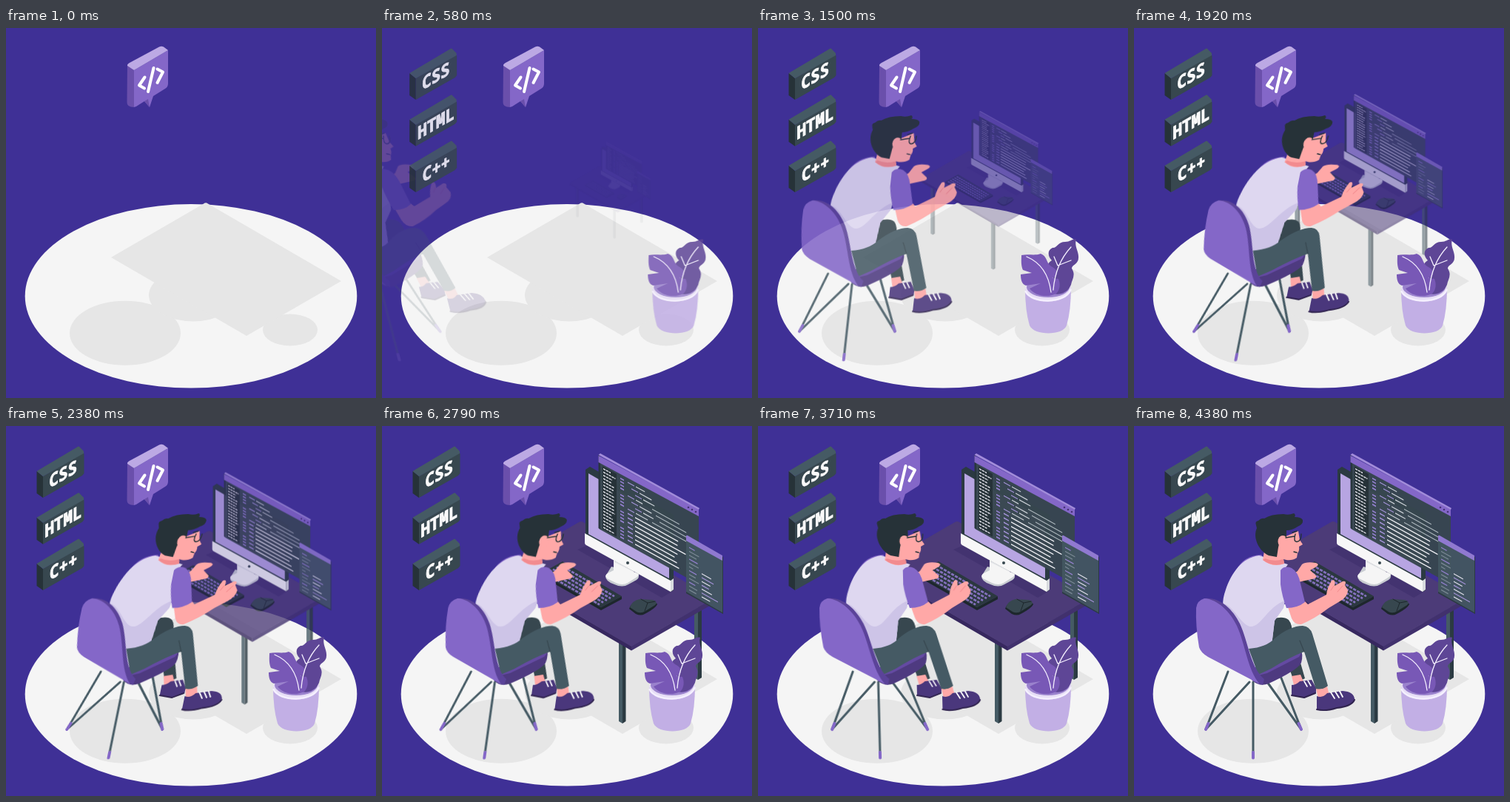
Write an HTML page that moves like this. It is 500x500 px and loops after 4.43 s.

```html
<!DOCTYPE html>
<html lang="en">
<head>
<meta charset="utf-8">
<title>Programmer at a desk</title>
<style>
html, body { margin: 0; height: 100%; overflow: hidden; background: #3f3096; }
svg { display: block; width: 100vw; height: 100vh; }
.anim { animation: 4430ms linear infinite both; }

#man { transform-origin: 191.5px 284.5px; animation-name: lightspeed; animation-timing-function: cubic-bezier(.36, -.01, .5, 1.38); }
@keyframes lightspeed {
  0% { transform: translate(-220px) skewX(20deg); opacity: 0; }
  58.7% { transform: translate(0px) skewX(-10deg); opacity: 1; }
  78.3% { transform: translate(0px) skewX(2deg); opacity: 1; }
  97.8%, 100% { transform: translate(0px) skewX(0deg); opacity: 1; }
}

#desk { transform-origin: 308px 219px; animation-name: zoom; }
@keyframes zoom {
  0%, 1% { transform: scale(.24); opacity: 0; }
  10% { transform: scale(.33); opacity: .03; }
  22.6% { transform: scale(.447); opacity: .14; }
  33.9% { transform: scale(.588); opacity: .34; }
  49.9% { transform: scale(.8); opacity: .69; }
  62.7%, 100% { transform: none; opacity: 1; }
}

.slide { animation-name: slide; animation-timing-function: cubic-bezier(.36, -.01, .5, 1.38); }
@keyframes slide {
  0%, 1% { transform: translate(var(--from)); opacity: 0; }
  22.5%, 100% { transform: translate(0px); opacity: 1; }
}

.label text { font: 700 24px "Noto Sans Mono", "DejaVu Sans Mono", monospace; fill: #fafafa; stroke: #fafafa; stroke-width: 1; stroke-linejoin: round; }
.line { fill: none; stroke-linecap: round; stroke-linejoin: round; }
</style>
</head>
<body>
<svg viewBox="0 0 500 500">
  <defs>
    <g id="plate">
      <path fill="#37474f" d="M50 68 103 37Q105.500 36 105.500 38V64L103 67 50 97Z"/>
      <path fill="#263238" d="M41.500 61 50 68V97L41.500 91Z"/>
      <path fill="#455a64" d="M41.500 61 97 28Q98 27 99 28L105 34V37L50 68Z"/>
    </g>
  </defs>

  <!-- floor and shadows -->
  <ellipse cx="250" cy="362.300" rx="224.300" ry="124.300" fill="#f5f5f5"/>
  <g fill="#e6e6e6">
    <ellipse cx="161" cy="412.300" rx="75" ry="43.500"/>
    <ellipse cx="384" cy="408" rx="37" ry="21.500"/>
    <ellipse cx="253" cy="361" rx="60" ry="35.500"/>
    <path d="M142 310 267 237.500Q270 235 273 237.500L453 342 325 416Z"/>
  </g>

  <!-- speech bubble -->
  <path fill="#8467c8" d="M173 57 219 30V75Q219 80 215 82L199 92 194 107 187 99 176 106 173 107Z"/>
  <path fill="#6a4fab" d="M164 49 173 57V107Q163 107 163.500 100ZM187 99 194 107 192 96Z"/>
  <path fill="#bca9e4" d="M164 51Q163.500 49 167 47L207 25.500Q210 24 213 25.500L219 30 173 57Z"/>
  <path class="line" stroke="#fff" stroke-width="4" d="M187.500 66.500 180 77.500 187 81.500M199.500 54 192 86M204.500 55.500 212 59.500 204.500 74"/>

  <g id="desk" class="anim">
    <!-- table -->
    <path fill="#455a64" d="M181 200H186V322L181 319ZM320 285H325V402L320 399ZM422 235H427V343L422 340Z"/>
    <path fill="#2b3a42" d="M186 200H190.500V319L186 322ZM325 285H329.500V399L325 402ZM427 235H432V340L427 343Z"/>
    <path fill="#37285f" d="M157 193 337 297V303.500L157 199Z"/>
    <path fill="#41316d" d="M337 297 448 233V240L337 303.500Z"/>
    <path fill="#4c3b78" d="M157 193 266 130Q269 128 272 130L448 233 337 298Z"/>
    <path fill="#433370" d="M264 167 278 161 390 225 378 232Z"/>
    <!-- keyboard and mouse -->
    <path fill="#1d272c" d="M215 199 296 245 324 230V234L296 249 215 203Z"/>
    <path fill="#2b383f" d="M215 199 244 183 324 230 296 245Z"/>
    <g id="keys" stroke="#8470bd" stroke-width="2.700" stroke-dasharray="4.300 1.500"></g>
    <path fill="#1d272c" d="M334 247Q336 240 344 237L372 240Q372 245 355 254 350 257 343 254Z"/>
    <path fill="#37474f" d="M335 245Q338 236 348 234L366 235Q374 238 369 242L356 250Q350 254 344 251Z"/>
    <path class="line" stroke="#1d272c" d="M350 234 359 239 355 250M359 239 369 237"/>
    <!-- monitor -->
    <path fill="#c9cdd2" d="M302 203Q302 210 314 214 325 219 333 214L344 208Q348 205 347 200L310 190Z"/>
    <path fill="#f5f5f5" d="M313 178 339 192 340 197 346 199Q348 202 343 205L332 212Q325 216 316 212L304 206Q300 202 305 199L313 195Z"/>
    <path fill="#dfe1e5" d="M314 178 339 192 340 197 314 184Z"/>
    <path fill="#2b3a42" d="M275 59 281 55 394 120V222L390 224 275 160Z"/>
    <path fill="#b7a5e2" d="M279 64 388 127V206L279 146Z"/>
    <path fill="#f7f7f7" d="M274 145 390 209V224L276 161Q274 160 274 158Z"/>
    <path fill="#d8dade" d="M390 209 394 206V221L390 224Z"/>
    <circle cx="332" cy="185" r="2" fill="#37474f"/>
    <!-- editor window -->
    <path fill="#37474f" fill-opacity=".97" d="M295 47 428 121V214L295 140Z"/>
    <path fill="#28363d" d="M292.500 39 295 41V140L292.500 138Z"/>
    <path fill="#8467c8" d="M292.500 40 428 112V122L292.500 49Z"/>
    <path fill="#a28cda" d="M292.500 39 295 37 429 111 428 113Z"/>
    <g fill="#463276"><circle cx="414" cy="110" r="1.300"/><circle cx="419" cy="113" r="1.300"/><circle cx="424" cy="116" r="1.300"/></g>
    <g id="code" transform="matrix(1 .555 0 1 294 49)"><rect x="4" y="3" width="19" height="85" fill="#263238"/></g>
    <!-- small window -->
    <path fill="#435660" fill-opacity=".96" d="M411 151 460 179V253L411 225Z"/>
    <path fill="#2b3a42" d="M460 176 461 178V254L411 226V224L460 252Z"/>
    <path fill="#9079d0" d="M411 149Q411 147 413 148L460 175V182L411 155Z"/>
    <g id="notes" transform="matrix(1 .555 0 1 411 156)"></g>
  </g>

  <g id="plant" class="anim slide" style="--from:30px">
    <path fill="#c2afe5" d="M361 352Q361 382 367 402C373 416 412 416 417 402Q423 382 423 350Z"/>
    <ellipse cx="392" cy="352.500" rx="31" ry="17" fill="#e7def6"/>
    <ellipse cx="392" cy="350" rx="29" ry="14" fill="#9a82cd"/>
    <path fill="#5e4696" d="M400 359C399 346 402 337 396 330 390 324 390 318 397 314 391 308 391 300 398 297 404 298 405 289 415 289 423 289 425 284 430 286 427 295 434 302 433 311 433 319 424 320 424 325 430 334 424 340 423 347 418 359 406 361 400 359Z"/>
    <path fill="#7858b6" d="M356 307C365 305 374 308 382 305 391 308 389 317 396 322 404 326 405 330 403 335L397 338 406 339C409 346 408 354 403 359 391 365 374 362 367 352L382 345 362 348C356 346 355 339 355 333L370 331 358 327C355 320 356 313 356 307Z"/>
    <path class="line" stroke="#f5f0ff" stroke-width="1.300" d="M363 309C382 317 393 334 396 357M423 296C409 311 401 330 399 354M400 309 405 321 423 314"/>
    <path class="line" stroke="#f5f0ff" stroke-width="2.500" d="M361.500 356C370 373 414 373 422.500 354"/>
  </g>

  <g id="man" class="anim">
    <!-- far arm and far leg -->
    <path fill="#ffa8a7" d="M203 208 221 196 227 187Q232 183 246 185 252 187 245 191L238 195 246 202Q248 206 240 207L222 211 206 222Z"/>
    <path fill="#37474f" d="M165 290 188 261Q201 256 209 262 214 268 214 282L231 341 217 348 204 310Z"/>
    <path fill="#ffa8a7" d="M213 338 225 336 231 350 217 354Z"/>
    <path fill="#4a377c" d="M213 350Q219 350 224 345L240 343 246 354V361L231 367 213 364Z"/>
    <path class="line" stroke="#30234f" stroke-width="2" d="M213 364 230 367 245 361"/>
    <path class="line" stroke="#fff" stroke-width="1.600" d="M230 345 234 352M235 344 239 351"/>
    <!-- chair legs -->
    <path class="line" stroke="#455a64" stroke-width="3" d="M127 332 97 410 156 346M161 346V448M180 346 226 410 198 338"/>
    <path class="line" stroke="#8467c8" stroke-width="4" d="M100.500 402 97 410M161 441V448.500M222.500 402 226 410"/>
    <!-- seat -->
    <path fill="#4e3a80" d="M150 315 225 300Q229 309 226 320 221 330 182 348 170 353 160 344Z"/>
    <path fill="#644aa2" d="M155 318 224 299Q228 306 223 312L180 334 164 338Z"/>
    <!-- torso -->
    <path fill="#8467c8" d="M138 195Q148 175 172 174L178 182Z"/>
    <path fill="#ded7f0" d="M169 175C146 178 132 198 124 221 118 238 119 248 128 256L152 302 160 328 184 316 187 288 190 263 202 246 206 226 203 194 208 187Z"/>
    <path fill="#cdc4e7" d="M122 240C136 245 146 271 158 271 172 271 181 244 204 236L202 246 190 263 187 288 185 305 160 328 145 288Z"/>
    <!-- near leg -->
    <path fill="#455a64" d="M155 301Q179 299 190 287 211 270 228 270 238 271 241 281L262 351Q257 357 246 356L230 305Q211 312 185 328L168 336Z"/>
    <path class="line" stroke="#37474f" stroke-width="1.200" d="M230 305 224 290"/>
    <path fill="#ffa8a7" d="M246 355Q254 357 261 352L264 364 249 368Z"/>
    <path fill="#4a377c" d="M247 365Q255 368 261 361L282 358Q297 359 298 369 296 378 274 381 257 387 247 383Z"/>
    <path class="line" stroke="#30234f" stroke-width="2" d="M247 383Q258 386 274 381 294 379 298 370"/>
    <path class="line" stroke="#fff" stroke-width="1.800" d="M266 360 271 368M272 359 277 367M278 358.500 282 366"/>
    <!-- chair back -->
    <path fill="#5b4399" d="M95 233C116 231 133 247 143 267 155 293 157 326 176 342L174 350 160 344 100 250Z"/>
    <path fill="#8467c8" d="M84 246Q85 236 95 233C113 234 130 251 139 270 151 296 153 329 170 349L159 343 100 312Q90 306 88 299 83 270 84 246Z"/>
    <!-- head -->
    <path fill="#ffa8a7" d="M176 169 203 150 222 142 224 154 228 160 223 163Q224 168 221 172L220 178Q214 182 206 181L202 180 203 186Q187 192 174 181Z"/>
    <path fill="#f28b8f" d="M177 179Q189 184 202 180L203 186Q187 191 174 181Z"/>
    <path fill="#263238" d="M165 134Q163 129 168 128 172 124 176 125 185 119 202 119 209 121 216 118 219 120 217 123 226 123 228 127 229 133 221 136 214 141 206 141L206 151 198 151 195 164 193 177 182 175C169 169 160 151 166 138Z"/>
    <ellipse cx="201" cy="156" rx="6.500" ry="8" fill="#ffa8a7"/>
    <path class="line" stroke="#263238" stroke-width="1.400" d="M205 151 217 149M218 146Q215 156 220 156.500 226 156 226 146M214 144 220 142M220 171 216 170"/>
    <!-- near arm -->
    <path fill="#ffa8a7" d="M207 242 231 237 235 241 260 228Q261 219 267 209 273 206 271 216L282 210Q288 209 285 215L289 222Q289 231 278 237L263 246Q245 260 226 268 217 269 213 260Z"/>
    <path class="line" stroke="#f28b8f" d="M282 216 275 224M270 216 266 222"/>
    <path fill="#8467c8" d="M198 195Q203 188 213 192 222 197 225 213L231 238Q221 246 206 246 200 230 198 214Z"/>
  </g>

  <g id="labels" class="anim slide" style="--from:-30px">
    <g class="label"><use href="#plate"/><text transform="matrix(.866 -.5 0 1 58.500 84)">CSS</text></g>
    <g class="label"><use href="#plate" y="62.700"/><text transform="matrix(.866 -.5 0 1 52.500 151)">HTML</text></g>
    <g class="label"><use href="#plate" y="125"/><text transform="matrix(.866 -.5 0 1 59 208.500)">C++</text></g>
  </g>
</svg>
<script>
const byId = id => document.getElementById(id);

function addLine(group, x1, y1, x2, y2, attrs = {}) {
  const el = document.createElementNS("http://www.w3.org/2000/svg", "line");
  for (const [k, v] of Object.entries({ x1, y1, x2, y2, ...attrs })) el.setAttribute(k, v);
  group.append(el);
}

let seed = 7;
function rand() {
  seed = (seed * 16807) % 2147483647;
  return seed / 2147483647;
}

for (let r = 0; r < 5; r++) {
  const x = 221 + r * 5, y = 199.2 - r * 2.8;
  addLine(byId("keys"), x, y, x + 73, y + 42.2);
}

const row = (group, x, y, len, stroke, width = 1.3, dash = "none") =>
  addLine(group, x, y, x + len, y, { stroke, "stroke-width": width, "stroke-dasharray": dash });

// Three columns: file list, markers, text
const code = byId("code");
for (let i = 0; i < 19; i++) {
  const y = 6 + i * 4.4;
  row(code, 5, y, 10 + rand() * 7, "#e4e4ec", 1.6, "3 .8");
  if (i % 5 < 4) row(code, 28, y, 5, "#9681d2", 1.8);
}
for (let i = 0; i < 14; i++) {
  const y = 6 + i * 6;
  const long = i > 6;
  const x = long ? 48 : 38 + (i % 3) * 5;
  if (!long) {
    row(code, x, y, 9, "#a795dc");
    row(code, x + 11, y, 8 + rand() * 9, "#cfd4da");
    if (i > 2) row(code, x + 33, y, 24 + rand() * 25, "#aeb8be");
  } else {
    row(code, 38, y, 7, "#a795dc", 1.7);
    row(code, x, y, 50 + rand() * 22, "#f1f1f5", 1.5);
  }
}

const notes = byId("notes");
for (let i = 0; i < 12; i++) {
  const y = 6 + i * 5.2;
  row(notes, 4, y, 5 + rand() * 9, i % 3 ? "#7e8c98" : "#9681d2");
  if (i > 4) row(notes, 21, y, 9 + rand() * 14, i % 2 ? "#e8e8f0" : "#a795dc");
}
</script>
</body>
</html>
```
